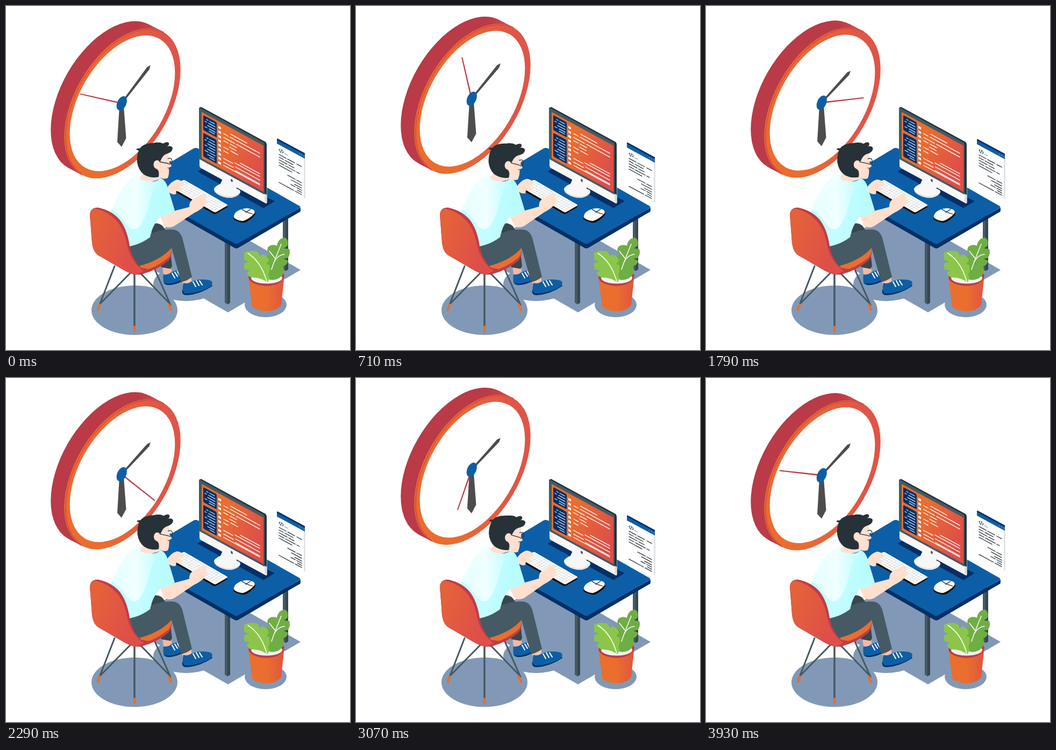
Animation, 640 px wide and 640 px high, one loop 4000 ms. Source, as an HTML page:

```html
<!DOCTYPE html>
<html lang="en">
<head>
<meta charset="utf-8">
<title>Working hours</title>
<style>
  html, body { margin: 0; height: 100%; overflow: hidden; background: #fff; }
  svg { display: block; width: 100vw; height: 100vh; }
  .line { fill: none; stroke-linecap: round; stroke-linejoin: round; }
  .skin { fill: #ffe0cf; }
  .shadow { fill: #8199b6; }
  .slate { fill: #455a64; }
  .dark { fill: #263238; }
  .blue { fill: #0c5fa6; }
  .navy { fill: #052f66; }
</style>
</head>
<body>
<svg viewBox="0 0 640 640">
  <defs>
    <linearGradient id="rim"><stop offset=".35" stop-color="#ea6c2f"/><stop offset=".85" stop-color="#e05547"/></linearGradient>
    <linearGradient id="side"><stop offset=".75" stop-color="#ba3a47"/><stop offset="1" stop-color="#d64e46"/></linearGradient>
    <linearGradient id="screen" y2=".3"><stop offset=".4" stop-color="#ea6e2e"/><stop offset="1" stop-color="#de4f49"/></linearGradient>
    <linearGradient id="shell" y2=".5"><stop offset=".2" stop-color="#e4613a"/><stop offset=".9" stop-color="#de4f49"/></linearGradient>
    <linearGradient id="shirt"><stop offset="0" stop-color="#e4ffff"/><stop offset=".4" stop-color="#f0ffff"/><stop offset=".8" stop-color="#b8fdff"/></linearGradient>
    <linearGradient id="pot"><stop offset=".5" stop-color="#ea6e2e"/><stop offset="1" stop-color="#df5541"/></linearGradient>
  </defs>

  <g class="shadow">
    <path d="M353 379L548 491 413 570 218 458Z"/>
    <ellipse cx="335" cy="517" rx="61" ry="32"/>
    <ellipse cx="239" cy="566" rx="80" ry="46"/>
    <ellipse cx="483" cy="556" rx="39" ry="23"/>
  </g>

  <g id="clock">
    <g fill="url(#side)">
      <ellipse transform="matrix(.866 -.5 0 1 191.5 168)" rx="125" ry="125"/>
      <path d="M266 34.200L291 47.200 142 314.800 117 301.800Z"/>
    </g>
    <g transform="matrix(.866 -.5 0 1 216.5 181)">
      <circle r="125" fill="url(#rim)"/>
      <path class="line" d="M-88 88A124.5 124.5 0 0 1 88 -88" stroke="#d64c48" stroke-width="2"/>
      <circle r="113" fill="#fff"/>
    </g>
    <path d="M211 186h8l4.500 60-8.500 16-8-9Z" fill="#4d4d4d"/>
    <path id="minute" d="M-1.500 0L-3-82 0-89 3-81 1.500 0Z" fill="#4d4d4d"/>
    <path id="second" d="M-1.300 0L-1-79H1L1.300 0Z" fill="#ba3a47"/>
    <ellipse class="blue" cx="215.300" cy="181" rx="8.500" ry="14" transform="rotate(24 215.300 181)"/>
  </g>

  <!-- desk -->
  <g class="slate">
    <path d="M515 390h10v100l-5 3-5-3Z"/><path d="M407 435h10v117l-5 3-5-3Z"/>
  </g>
  <path d="M520 390h5v100l-5 3ZM412 435h5v117l-5 3Z" fill="#37474f"/>
  <path class="navy" d="M234 335L429 442 548 375V380Q548 383 545 384L432 450Q429 452 425 450L234 341Z"/>
  <path class="blue" d="M349 265Q353 263 357 265L546 372Q549 374 546 376L433 441Q429 444 424 441L234 334Z"/>
  <path class="navy" d="M356 308L370 300 500 363 479 376Z"/>

  <!-- monitor -->
  <path d="M387 341Q389 335 399 331L404 320 428 333 429 341Q436 342 436 347 433 354 420 357 405 358 393 350 387 346 387 341Z" fill="#dfe2e5"/>
  <path d="M387 340Q389 335 399 331L404 320 428 333 429 340Q436 342 436 345 433 351 420 354 405 355 393 347 387 344 387 340Z" fill="#f7f7f7"/>
  <g transform="matrix(1 .545 0 1 360 190)">
    <rect y="20" width="125.500" height="90" rx="3" fill="#f8f8f9"/>
    <path d="M121 93h4.500v13l-4.500 3Z" fill="#dcdfe2"/>
    <path class="dark" d="M-1 0L3-4H123Q125-3 125 0V93H-1Z"/>
    <path class="slate" d="M-1 2Q-1-1 2-1H119Q121-1 121 2V95H-1Z"/>
    <rect x="4" y="5" width="115" height="86" fill="url(#screen)"/>
    <path class="navy" d="M9 9h21q2 0 2 2v26H9q-2 0-2-2V11q0-2 2-2ZM9 42h21q2 0 2 2v42H9q-2 0-2-2V44q0-2 2-2Z"/>
    <path class="line" d="M13 14h3m3 0h9M10 19h3m4 0h12M15 24h14M10 29h4m4 0h11M18 33h10M13 48h3m3 0h9M10 53h3m4 0h12M15 58h14M10 63h4m4 0h11M15 68h13M10 73h6m3 0h10M15 78h12M19 82h9" stroke="#c7e6f8" stroke-width="1.400"/>
    <path d="M37.500 14V85" stroke="#fff" stroke-width="5" stroke-dasharray="4 4.200"/>
    <path class="line" d="M58 17h30M45 23h8m4 0h55M45 30h20m4 0h43M45 36h8m4 0h12M56 42h12M45 48h9m4 0h13M76 61h36M45 55h8M66 66h46M45 69h17m5 4h45M45 76h18m4 4h45M45 82h67" stroke="#fff" stroke-width="1.500"/>
    <ellipse cx="60" cy="102" rx="2" ry="2.600" fill="#455a64"/>
  </g>

  <!-- keyboard and mouse -->
  <g transform="matrix(.866 .5 -.866 .5 331 323)">
    <rect x="3" y="3" width="95" height="29" rx="3" fill="#111"/>
    <rect width="95" height="28" rx="3" fill="#fff"/>
    <g stroke="#d2d5d8" stroke-width=".8">
      <path d="M3 4H92M3 9H92M3 14H92M3 19H92M3 24H92"/>
      <path d="M4 14H92" stroke-width="20" stroke-dasharray=".8 4.500"/>
    </g>
  </g>
  <path d="M423 394Q427 388 437 384L455 379Q465 384 464 388 455 399 444 403 438 404 427 399 422 397 423 394Z" fill="#111"/>
  <path d="M424 390Q426 382 438 378 450 374 460 379 464 382 462 386 453 396 441 400 434 400 427 396 423 394 424 390Z" fill="#fafafa"/>
  <path class="line" d="M439 378Q446 384 459 387M446 384L455 378" stroke="#222" stroke-width="1.200"/>

  <!-- floating page -->
  <g id="page">
    <g transform="matrix(1 .54 0 1 504 247)">
      <path d="M1 7H51V83H1Z" fill="#fff"/>
      <path d="M50 8l3-1V82l-3 2Z" fill="#e2e3e5"/>
      <path class="blue" d="M0 1Q0-1 2-1H52V9H0Z"/>
      <path class="navy" d="M0 1Q0-1 2-1H52V2H0Z"/>
      <path d="M41 5h2m2 0h2m2 0h2" stroke="#e4613a" stroke-width="2"/>
      <path class="line" d="M6 16L4 18.500 6 21M9 15L7 22M10 16L12 18.500 10 21" stroke="#263238"/>
      <path class="line" d="M15 20h.1m2 0h.1m2 0h.1" stroke="#263238" stroke-width="1.300"/>
      <path class="line" d="M4 27h13m3 0h13m4 0h9M4 32h8m3 0h15M4 37h15m3 0h10M4 42h9m3 0h18m3 0h5M4 47h9M14 47h14M20 57h14m3 0h9M27 62h19M33 67h13M26 71h8m3 0h9M4 79h27m3 0h12M38 75h8" stroke="#263238" stroke-width="1.400"/>
    </g>
  </g>

  <!-- chair legs -->
  <g class="line" stroke="#455a64" stroke-width="3">
    <path d="M202 484L174 556M275 486L306 556M232 496L176 553M249 496L304 553"/>
    <path d="M239 494V600" stroke-width="3.500"/>
    <path d="M174 556L171 565M303 556L307 565M239 597V605" stroke="#ea6c2f" stroke-width="4.500"/>
  </g>

  <!-- far leg and shoe -->
  <path d="M291 482L307 486 309 497 293 500Z" fill="#f7b7a0"/>
  <path d="M271 405Q285 402 292 410L302 425 309 484 306 489 289 486 270 430Z" fill="#37474f"/>
  <path class="navy" d="M293 510Q292 518 300 519 312 520 326 513V508Z"/>
  <path class="blue" d="M293 499Q300 502 308 495L316 492 326 497V510Q310 518 296 516 291 515 293 499Z"/>
  <path class="line" d="M309 497l5 9M314 495l5 8M319 494l4 7" stroke="#fff" stroke-width="2"/>

  <!-- seat -->
  <path d="M225 440L308 449Q310 463 303 473 283 491 250 500 233 500 215 487Z" fill="#c03c47"/>
  <path d="M240 470L308 449Q309 463 300 470 280 486 255 493Z" fill="#ea6e2e"/>

  <!-- near leg and shoe -->
  <path d="M326 506L344 502 346 517 330 522Z" fill="#ffc2ab"/>
  <path class="slate" d="M225 445L268 424Q290 414 312 416 325 418 329 435L346 504Q338 511 326 514L308 450Q288 473 247 484 232 470 225 445Z"/>
  <path class="navy" d="M328 528Q326 538 336 538 360 537 384 521L382 516Z"/>
  <path class="blue" d="M330 515Q338 518 346 512L358 509Q372 508 381 511 386 514 382 521 362 534 335 535 326 535 330 515Z"/>
  <path class="line" d="M348 513l5 9M354 511l5 9M360 511l5 8" stroke="#fff" stroke-width="2"/>

  <!-- person -->
  <path id="farHand" class="skin" d="M299 339Q307 326 318 323 325 323 332 330 329 336 322 335 328 339 327 345 323 347 317 344L316 350Q307 352 301 344Z"/>
  <path d="M258 300L286 308 285 321Q272 330 252 323Z" fill="#ffd3c0"/>
  <path d="M194 386Q201 366 216 340 229 319 248 313 257 321 270 326 280 328 288 320 298 325 301 338L314 381Q302 390 286 392 271 410 268 430 251 443 230 447 220 429 207 407Z" fill="url(#shirt)"/>
  <path d="M197 378Q212 388 220 401 237 426 250 408 262 390 267 365 271 345 279 335L301 338 314 381Q302 390 286 392 271 410 268 430 251 443 230 447L207 407 194 386Z" fill="#b9fdff" opacity=".8"/>
  <path class="skin" d="M250 316Q258 313 270 319L286 318 288 321Q272 330 251 323Z"/>
  <path id="forearm" class="skin" d="M287 391Q303 390 314 381L341 374Q341 364 347 360 357 355 364 350 372 348 373 353 369 358 373 359 377 364 371 370 363 379 350 385L312 410Q299 415 293 407Z"/>

  <!-- chair back -->
  <path d="M156 388Q157 375 171 375 196 380 211 397 225 414 230 446 235 472 251 487L268 490Q255 500 240 500 228 497 215 489L172 464Q162 458 160 440Z" fill="#c03c47"/>
  <path d="M156 388Q157 377 167 377 189 382 205 399 220 415 226 447 232 475 256 493 246 499 240 499 228 496 215 488L172 464Q162 458 160 440Z" fill="url(#shell)"/>

  <g id="head">
    <path class="skin" d="M273 290L284 277 302 273 304 288 308 298 303 301Q304 313 301 320 293 324 283 317Z"/>
    <path d="M303 300l-4 1 4 2Z" fill="#e4613a"/>
    <path class="dark" d="M242 267Q244 264 249 265 255 256 273 255 286 252 292 256 301 251 303 255 304 260 299 261 308 259 310 264 310 272 299 275 292 277 288 287L280 303Q286 306 284 318 271 321 259 315 247 308 244 291 243 278 247 269Z"/>
    <ellipse class="skin" cx="281" cy="295" rx="6.500" ry="8"/>
    <path class="line" d="M286 290L302 293M301 284Q308 281 309 288 308 295 303 294" stroke="#263238" stroke-width="1.300"/>
    <path d="M304 289l3-1 0 4-3 1Z" fill="#0c5fa6"/>
  </g>

  <!-- plant -->
  <path d="M451 505Q458 519 485 518 510 516 518 500L512 556Q503 568 484 568 466 567 458 559Z" fill="url(#pot)"/>
  <path d="M451 505Q452 494 484 492 514 491 518 501 516 519 485 521 454 519 451 505Z" fill="#c03c47"/>
  <ellipse cx="485" cy="506" rx="29" ry="10.500" fill="#f4f1ec"/>
  <path d="M490 509Q482 499 488 483 481 474 485 465L492 463Q483 457 488 448 495 442 504 446 506 432 519 431 526 434 524 446L517 451 527 452Q530 461 524 469L516 470 525 474Q523 482 516 484 520 499 507 507 498 511 490 509Z" fill="#6fae44"/>
  <path class="line" d="M494 490Q500 472 512 443M501 470L490 456M498 478Q505 463 518 462" stroke="#fff" stroke-width="1.500"/>
  <path d="M443 459Q454 453 468 457L473 466 476 462Q487 464 489 474L484 480 490 482Q492 493 488 499 492 508 486 514 474 505 457 505 450 503 448 496L454 492 444 490Q442 483 444 478L452 476 443 472Z" fill="#8bc64a"/>
  <path class="line" d="M450 460Q475 476 485 512" stroke="#fff" stroke-width="1.500"/>
</svg>
<script>
  const LOOP = 4000, FRAMES = 56;
  const place = (id, transform) =>
    document.getElementById(id).setAttribute('transform', transform);

  function draw(now) {
    const frame = Math.floor((now + 5) % LOOP / LOOP * FRAMES);
    const t = frame / FRAMES * LOOP;
    const sway = (1 - Math.cos(Math.PI * t / 1000)) / 2;
    const m = Math.min(t / 1550, 1);
    const tipY = 71 - 12 * m * m * (3 - 2 * m);
    const angle = Math.atan2(54, tipY) * 180 / Math.PI;

    place('clock', `translate(0 ${-10.5 * sway})`);
    place('minute', `translate(215 181) rotate(${angle}) scale(1 ${Math.hypot(54, tipY) / 89})`);
    place('second', `translate(215 181) rotate(${282.7 + t * .09})`);
    place('page', `translate(0 ${9 * sway})`);
    place('head', `translate(0 ${1.5 * sway}) rotate(${5.5 * sway} 280 322)`);
    place('farHand', `translate(${-sway} ${-2 * sway})`);
    place('forearm', `rotate(${-1.5 * sway} 300 400)`);
    requestAnimationFrame(draw);
  }
  draw(performance.now());
</script>
</body>
</html>
```
